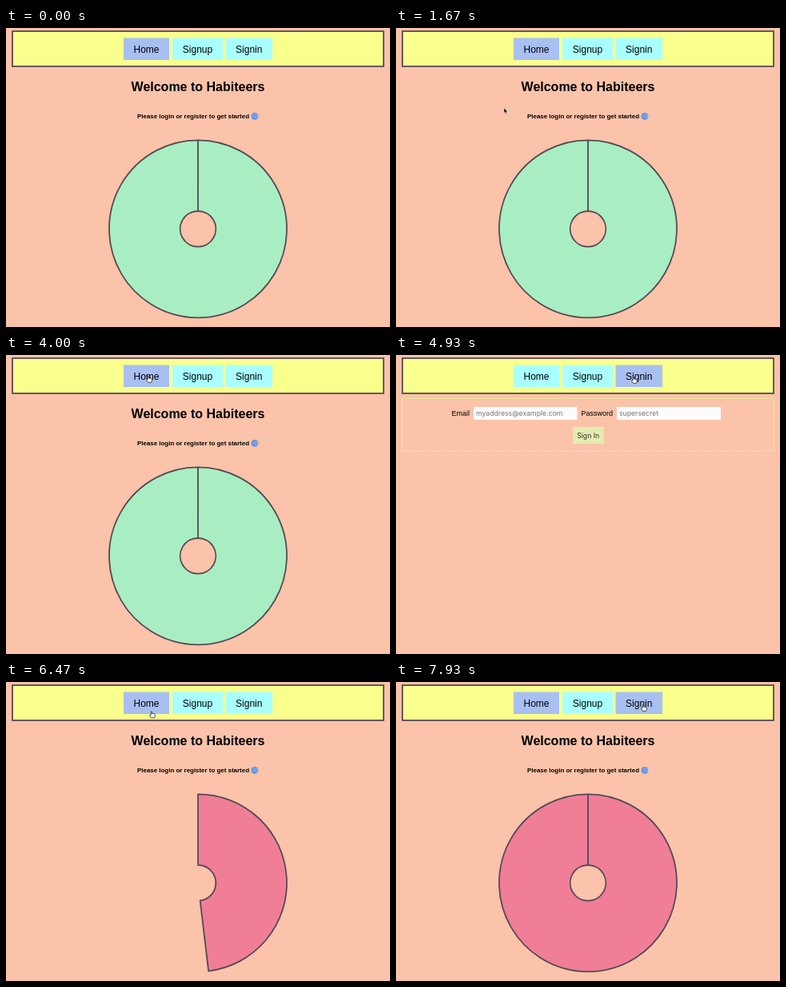
An HTML page for the animation above (8 s loop, 480 by 374 pixels).

```html
<!DOCTYPE html>
<html lang="en">
<head>
<meta charset="utf-8">
<title>Welcome</title>
<style>
  html, body { margin: 0; height: 100%; overflow: hidden; background: #fbc3a9; }
  svg { display: block; width: 100vw; height: 100vh; font-family: "Liberation Sans", Arial, sans-serif; }
  .nav { font-size: 12px; text-anchor: middle; }
  .bold { font-weight: bold; text-anchor: middle; }
  .label { font-size: 9px; }
  .field { font: 8.7px Inter, sans-serif; fill: #757575; }
</style>
</head>
<body>
<svg viewBox="0 0 480 374">
  <rect width="480" height="374" fill="#fbc3a9"/>
  <rect x="8" y="4" width="464" height="44" fill="#f8ff8c" stroke="#564a58" stroke-width="1.8"/>
  <g id="nav" class="nav"></g>

  <g id="home">
    <text class="bold" x="240" y="79" font-size="16">Welcome to Habiteers</text>
    <text class="bold" x="234" y="113" font-size="7.93">Please login or register to get started</text>
    <circle cx="311" cy="110.3" r="4.4" fill="#5b8de0"/>
    <path d="M311 110.3c1-1 2 .6 1 1.5s-3 .2-3-1.6 2-3 4-2.1 2 3.6.4 4.9" fill="none" stroke="#b3d3fa" stroke-width=".7"/>
    <path id="ring" stroke="#564a58" stroke-width="1.8" stroke-linejoin="round"/>
    <path id="tip" d="M242 318.500l4-6h60q3 0 3 3v6q0 3-3 3h-60z" fill="#a1dcb7" stroke="#7e9e8b" stroke-width="1" stroke-dasharray="1 1"/>
  </g>

  <g id="signin">
    <rect x="7.500" y="54.500" width="465" height="66" fill="none" stroke="#e4f59a" stroke-dasharray="3 1"/>
    <text class="label" x="69.500" y="76">Email</text>
    <rect x="97" y="65" width="129.500" height="16" fill="#fdfcfd"/>
    <text class="field" x="100" y="76">myaddress@example.com</text>
    <text class="label" x="231.500" y="76">Password</text>
    <rect x="276" y="65" width="130" height="16" fill="#fdfcfd"/>
    <text class="field" x="279" y="76">supersecret</text>
    <rect x="221" y="90" width="38.500" height="21" fill="#e5ecb0"/>
    <text class="field" x="240.200" y="103.700" text-anchor="middle" style="fill:#333">Sign In</text>
  </g>

  <g id="cursor">
    <path id="arrow" d="M0 0v6.500l1.500-1.400 1 2.300 1.100-.5-1-2.200h2z" fill="#111" stroke="#fff" stroke-width=".4"/>
    <path id="hand" d="M-.8 4.500V.7q.7-1 1.400 0v2.400q2.800-.3 3.700 1.200v2.200L3.500 8.300H-.5L-2.700 5q.5-1.400 1.900-.2z" fill="#fff" stroke="#222" stroke-width=".8" stroke-linejoin="round"/>
  </g>
</svg>
<script>
const LOOP = 8000, SIGNIN_AT = 4830, HOME_AT = 5650, SWEEP_AT = 6045, SWEEP = 1500;
const $ = id => document.getElementById(id);
const show = (id, on) => $(id).style.display = on ? '' : 'none';

const buttons = [['Home', 147, 57], ['Signup', 208, 63], ['Signin', 274.5, 58.5]]
  .map(([name, x, w]) => ({ name, x, w }));
$('nav').innerHTML = buttons.map(b =>
  `<rect x="${b.x}" y="12.5" width="${b.w}" height="27.5"/>` +
  `<text x="${b.x + b.w / 2}" y="31">${b.name}</text>`).join('');
const plates = $('nav').querySelectorAll('rect');

// pointer stops: time, x, y
const stops = [
  [0, 158, -12], [560, 158, -12], [730, 161, 9], [1400, 135, 100], [2300, 135, 100],
  [3200, 178, 26], [4250, 178, 26], [4720, 297, 27], [5150, 297, 27], [5530, 182, 35],
  [6470, 182, 36.5], [6900, 182, 36.5], [7450, 250, 3], [7900, 309, 28], [LOOP, 309, 28]
];

function pointer(t) {
  const i = stops.findIndex(s => s[0] > t);
  const [t0, x0, y0] = stops[i - 1], [t1, x1, y1] = stops[i];
  const u = (t - t0) / (t1 - t0), k = u * u * (3 - 2 * u);
  return [x0 + (x1 - x0) * k, y0 + (y1 - y0) * k];
}

// cubic-bezier(.25, .1, .25, 1)
function ease(x) {
  if (x <= 0 || x >= 1) return x <= 0 ? 0 : 1;
  const curve = (a, b, u) => 3 * a * u * (1 - u) ** 2 + 3 * b * u * u * (1 - u) + u ** 3;
  let lo = 0, hi = 1;
  for (let i = 0; i < 24; i++) {
    const mid = (lo + hi) / 2;
    if (curve(.25, .25, mid) < x) lo = mid; else hi = mid;
  }
  return curve(.1, 1, lo);
}

function sector(part) {
  if (part <= 0) return '';
  const a = Math.min(part, .9999) * 2 * Math.PI, large = +(part > .5);
  const at = r => `${240 + r * Math.sin(a)} ${251.3 - r * Math.cos(a)}`;
  return `M240 140.3A111 111 0 ${large} 1 ${at(111)}L${at(22.3)}A22.3 22.3 0 ${large} 0 240 229Z`;
}

function draw(t) {
  const signin = t >= SIGNIN_AT && t < HOME_AT, again = t >= HOME_AT;
  const [x, y] = pointer(t);
  const over = buttons.findIndex(b => x >= b.x && x <= b.x + b.w && y >= 12.5 && y <= 40);
  const active = signin ? 2 : 0;

  plates.forEach((p, i) => p.setAttribute('fill', i === active || i === over ? '#a8bff2' : '#a9ffff'));
  show('home', !signin);
  show('signin', signin);
  show('tip', t > 600 && t < 870);
  $('ring').setAttribute('d', sector(again ? ease((t - SWEEP_AT) / SWEEP) : 1));
  $('ring').setAttribute('fill', again ? '#f07e97' : '#a9eec2');
  $('cursor').setAttribute('transform', `translate(${x} ${y})`);
  show('arrow', over < 0);
  show('hand', over >= 0);
}

const start = performance.now();
function tick() {
  draw((performance.now() - start) % LOOP);
  requestAnimationFrame(tick);
}
tick();
</script>
</body>
</html>
```
